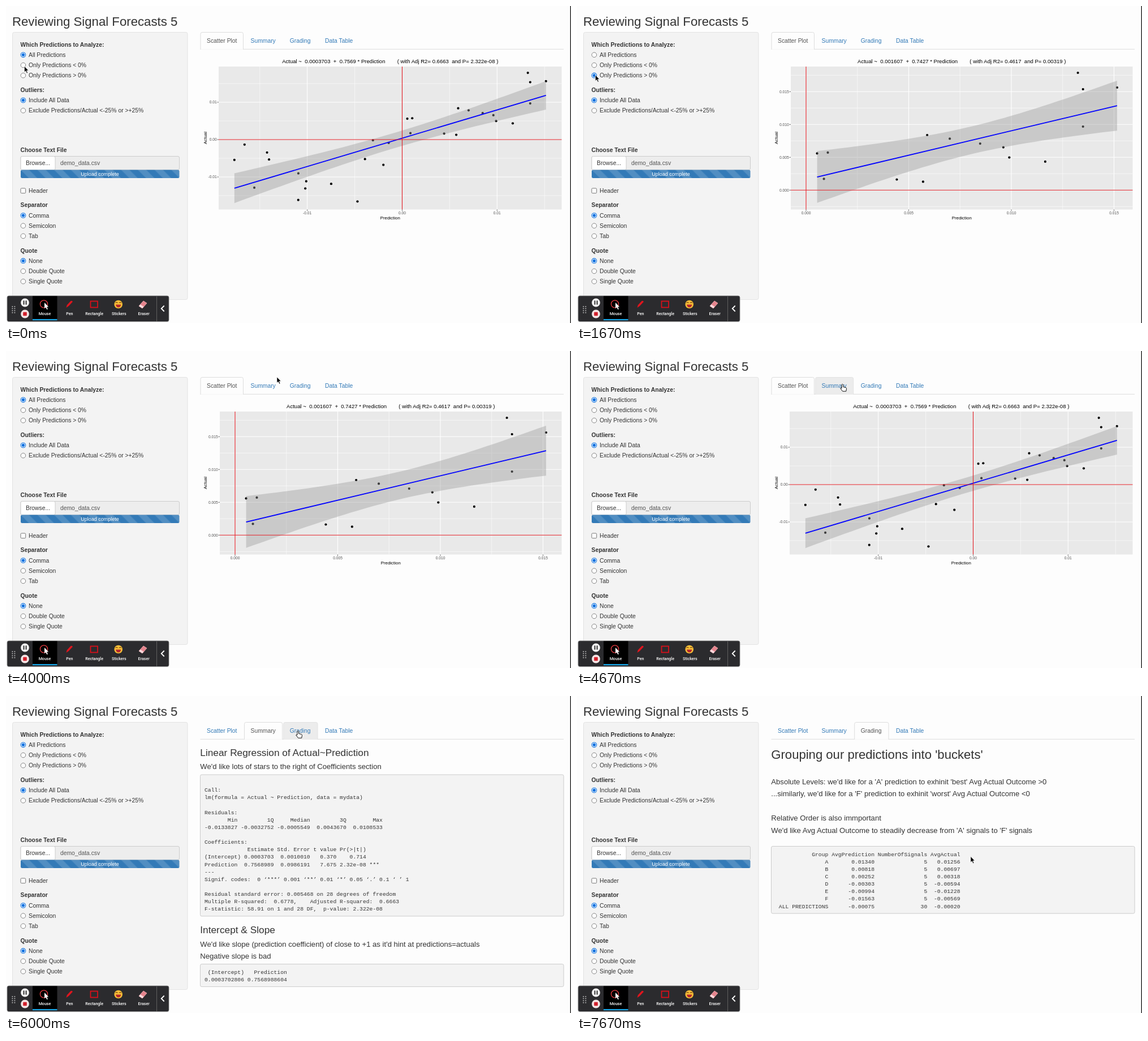
An HTML page for the animation above (8 s loop, 999 by 560 pixels).

```html
<!DOCTYPE html>
<html>
<head>
<meta charset="utf-8">
<style>
html, body { margin: 0; width: 100%; height: 100%; overflow: hidden; background: #fdfdfd; }
svg { display: block; width: 999px; height: 560px; font-family: "Liberation Sans", Arial, sans-serif; }
text { white-space: pre; }
.mono { font-family: "Liberation Mono", monospace; }
.bar { font-family: Roboto, sans-serif; font-weight: 500; }
</style>
</head>
<body>
<svg viewBox="0 0 999 560">
  <defs>
    <pattern id="stripes" width="29.6" height="29.6" patternUnits="userSpaceOnUse" x="26" y="289.5">
      <path fill="#337ab7" d="M0 0h29.6v29.6h-29.6z"/>
      <path fill="#fff" fill-opacity=".15" d="M0 0h14.8L29.6 14.8V29.6zM0 14.8L14.8 29.6H0z"/>
    </pattern>
  </defs>
  <g id="base"></g><g id="view"></g><g id="bar"></g><g id="mouse"></g>
</svg>
<script>
const $ = id => document.getElementById(id);
const esc = s => String(s).replace(/&/g, '&amp;').replace(/</g, '&lt;');
const text = (x, y, s, size = 10.35, fill = '#333', more = '') =>
  `<text x="${x}" y="${y}" font-size="${size}" fill="${fill}" ${more}>${esc(s)}</text>`;
const rect = (x, y, w, h, fill, more = '') =>
  `<rect x="${x}" y="${y}" width="${w}" height="${h}" fill="${fill}" ${more}/>`;
const path = (d, fill, stroke = 'none', w = 1, more = '') =>
  `<path d="${d}" fill="${fill}" stroke="${stroke}" stroke-width="${w}" ${more}/>`;
const dot = (x, y, r, fill, more = '') => `<circle cx="${x}" cy="${y}" r="${r}" fill="${fill}" ${more}/>`;
const BOLD = 'font-weight="bold"', MID = 'text-anchor="middle"', END = 'text-anchor="end"';

// Sidebar
const radio = (y, on) => on
  ? dot(30.4, y, 4.3, '#fff', 'stroke="#0b70e0" stroke-width="1.1"') + dot(30.4, y, 2.7, '#0b70e0')
  : dot(30.4, y, 4.3, '#fff', 'stroke="#767676" stroke-width=".9"');
const choices = (y, labels, on) => labels.map((s, i) =>
  radio(y + i * 18.2, i === on) + text(40, y + i * 18.2 + 3.7, s)).join('');
const label = (y, s) => text(25.5, y, s, 10.35, '#333', BOLD);

$('base').innerHTML =
  text(11, 35, 'Reviewing Signal Forecasts 5', 22.2) +
  rect(11.5, 46.5, 309.5, 472, '#f3f3f3', 'stroke="#e3e3e3" rx="3"') +
  label(71.6, 'Which Predictions to Analyze:') + label(151.6, 'Outliers:') +
  choices(166.5, ['Include All Data', 'Exclude Predictions/Actual <-25% or >+25%'], 0) +
  label(257.6, 'Choose Text File') +
  rect(26, 265.5, 280.5, 24, '#ededed', 'stroke="#ccc" rx="2.5"') +
  rect(26, 265.5, 61, 24, '#fff', 'stroke="#ccc" rx="2.5"') +
  text(35, 281, 'Browse...') + text(96, 281, 'demo_data.csv', 10.35, '#555') +
  rect(26, 289.5, 280.5, 14.5, 'url(#stripes)', 'rx="2.5"') +
  text(166, 300, 'Upload complete', 9, '#fff', MID) +
  rect(26, 322, 8.7, 8.7, '#fff', 'stroke="#767676" rx="1.5"') + text(40, 330, 'Header') +
  label(355.2, 'Separator') + choices(370, ['Comma', 'Semicolon', 'Tab'], 0) +
  label(435.6, 'Quote') + choices(450.2, ['None', 'Double Quote', 'Single Quote'], 0) +
  rect(997.6, 0, 1.4, 560, '#222');

// Recorder toolbar
const grip = [0, 1, 2, 3].map(i => dot(11.4, 531 + i * 3.6, 1, '#bbb') + dot(15.4, 531 + i * 3.6, 1, '#bbb')).join('');
const arrow = 'l0 10.2 2.4-2 1.9 4 1.6-.8-1.8-3.8 3.1-.2z';
$('bar').innerHTML =
  rect(2, 512, 286, 45.5, '#2b2b2e', 'rx="3" stroke="#888" stroke-width=".8"') +
  rect(47, 512.5, 43.5, 42.5, '#000') + rect(47, 553, 43.5, 2.2, '#14a5e6') + grip +
  dot(33.5, 524, 7.4, '#f4f4f4') + rect(30.5, 520.5, 2, 7, '#333') + rect(34.6, 520.5, 2, 7, '#333') +
  dot(33.5, 544, 7.4, '#f3e4e4') + rect(30.2, 540.7, 6.6, 6.6, '#d3202c', 'rx="1"') +
  dot(67, 526.5, 6.6, 'none', 'stroke="#e0393e" stroke-width="1.4"') + path('M68 524' + arrow, '#fff') +
  path('M106.5 533l1.2-4.5 6.6-7.2q2.6-1.6 3.6 1.2l-7 7.6z', '#e0151e') +
  rect(149.5, 521.5, 12.5, 11, 'none', 'stroke="#d8101a" stroke-width="1.8"') +
  dot(198.7, 527, 7.3, '#f6bf38') +
  path('M193.5 524.5q2-2 4 0M200 524.5q2-2 4 0', 'none', '#6b3a10', 1.1) +
  path('M194 527.5h9.4q-1 5-4.7 5t-4.7-5z', '#b3262c') +
  path('M235 530l8-9 6 4-8 9z', '#e5848d', '#f3aeb4', .8) + path('M235 530l2.5-2.8 6 4-2.5 2.8z', '#f8dadd') +
  ['Mouse', 'Pen', 'Rectangle', 'Stickers', 'Eraser'].map((s, i) =>
    text(68.5 + i * 43.8, 546, s, 7.1, '#fff', MID + ' class="bar"')).join('') +
  rect(266, 513, .9, 44, '#666') + path('M279.7 529.5l-5 5 5 5', 'none', '#fff', 1.8);

// Tabs
const tabs = [['Scatter Plot', 344, 419.5], ['Summary', 421.5, 488.7], ['Grading', 490.7, 551], ['Data Table', 553, 625]];
const tabBar = (on, hover) => path('M343.5 76.3H986', 'none', '#ddd') + tabs.map(([s, a, b], i) => {
  const box = `M${a} 76.8V49.5q0-3 3-3H${b - 3}q3 0 3 3V76.8`;
  const back = i === on ? path(box, '#fdfdfd', '#ddd') : i === hover ? path(box, '#ececec', '#e2e2e2') : '';
  return back + text(a + 11, 65.2, s, 10.35, i === on ? '#555' : '#337ab7');
}).join('');

// Scatter plot: values in units of 0.0001
const data = [
  [-176.8, -54.4], [-166.1, -13.3], [-142.4, -34.6], [-140.3, -53.3], [-155.8, -128.6], [-109.4, -90.4],
  [-101.1, -111.7], [-102.1, -130.8], [-109.5, -161.7], [-74.8, -118.5], [-47.1, -165.7], [-39.2, -52.2],
  [-19.8, -67.7], [-30.8, -1.8], [-14.2, -9], [5.4, 55.9], [10.6, 57.2], [8.7, 17.1], [44.2, 16.2],
  [57, 12.8], [59, 83.9], [70, 78.3], [84.8, 70.9], [96.1, 65.3], [99, 49.8], [116.5, 43.4],
  [134.9, 96.8], [134.9, 153.7], [132.4, 178.7], [151.5, 156.3]];
const plots = [
  { keep: () => true, left: 376, x0: 700.5, kx: 1.678, y0: 236, ky: .66, step: 100, dec: 2, q: 2.048,
    title: ['0.0003703  +  0.7569', '0.6663  and P= 2.322e-08'] },
  { keep: p => p[0] < 0, left: 380, x0: 955, kx: 3.1, y0: 118, ky: 1.388, step: 50, dec: 3, q: 2.16,
    title: ['-0.007295  +  0.07053', '-0.07147  and P= 0.801'] },
  { keep: p => p[0] > 0, left: 378, x0: 405, kx: 3.63, y0: 325.3, ky: 1.16, step: 50, dec: 3, q: 2.16,
    title: ['0.001607  +  0.7427', '0.4617  and P= 0.00319'] }];

function regress(pts) {
  const n = pts.length, sum = f => pts.reduce((s, p) => s + f(p), 0);
  const mx = sum(p => p[0]) / n, my = sum(p => p[1]) / n;
  const sxx = sum(p => (p[0] - mx) ** 2), b = sum(p => (p[0] - mx) * (p[1] - my)) / sxx;
  const at = x => my + b * (x - mx);
  const s = Math.sqrt(sum(p => (p[1] - at(p[0])) ** 2) / (n - 2));
  return { at, err: x => s * Math.sqrt(1 / n + (x - mx) ** 2 / sxx) };
}

function drawPlot({ keep, left, x0, kx, y0, ky, step, dec, q, title }) {
  const R = 982.5, T = 107, B = 359.5, mid = (left + R) / 2;
  const X = v => x0 + v * kx, Y = v => y0 - v * ky;
  const pts = data.filter(keep), { at, err } = regress(pts);
  let grid = '', axis = '';
  for (let i = -8; i <= 8; i++) {
    const v = i * step / 2, x = X(v), y = Y(v), major = i % 2 === 0, w = major ? 1.1 : .55;
    const name = (v / 1e4).toFixed(dec);
    if (x > left && x < R) {
      grid += path(`M${x} ${T}V${B}`, 'none', '#fff', w);
      if (major) axis += path(`M${x} ${B}v2.5`, 'none', '#444', .8) + text(x, 368, name, 6.7, '#555', MID);
    }
    if (y > T && y < B) {
      grid += path(`M${left} ${y}H${R}`, 'none', '#fff', w);
      if (major) axis += path(`M${left} ${y}h-2.5`, 'none', '#444', .8) + text(left - 3.2, y + 2.4, name, 6.7, '#555', END);
    }
  }
  const xs = pts.map(p => p[0]), lo = Math.min(...xs), hi = Math.max(...xs);
  const steps = Array.from({ length: 41 }, (_, i) => lo + (hi - lo) * i / 40);
  const edge = sign => steps.map(x => X(x) + ' ' + Y(at(x) + sign * q * err(x)));
  const band = 'M' + [...edge(1), ...edge(-1).reverse()].join('L') + 'z';
  return rect(left, T, R - left, B - T, '#e9e9e9') + grid +
    pts.map(p => dot(X(p[0]), Y(p[1]), 2.1, '#000')).join('') +
    path(band, '#999', 'none', 0, 'fill-opacity=".4"') +
    path(`M${X(lo)} ${Y(at(lo))}L${X(hi)} ${Y(at(hi))}`, 'none', '#00f', 1.8) +
    path(`M${left} ${y0}H${R}M${x0} ${T}V${B}`, 'none', '#e01c24', 1.1) + axis +
    text(mid, 101.3, `Actual ~  ${title[0]} * Prediction        ( with Adj R2= ${title[1]} )`, 9.57, '#000', MID) +
    text(mid, 377, 'Prediction', 7.9, '#000', MID) +
    text(0, 0, 'Actual', 7.9, '#000', MID + ' transform="translate(354.5 233) rotate(-90)"');
}

// Text views
const pre = (y, lines) => rect(343.5, y + .5, 642.5, 13.8 + Math.max(0, lines.length * 13.13 - .2), '#f3f3f3', 'stroke="#ccc" rx="2.5"') +
  lines.map((s, i) => text(351, y + 17.6 + i * 13.13, s, 9.72, '#333', 'class="mono"')).join('');
const h3 = (y, s) => text(343.3, y, s, 17.3);
const h4 = (y, s) => text(343.3, y, s, 13.12);

const report = `
Call:
lm(formula = Actual ~ Prediction, data = mydata)

Residuals:
       Min         1Q     Median         3Q        Max
-0.0133827 -0.0032752 -0.0005549  0.0043670  0.0108533

Coefficients:
             Estimate Std. Error t value Pr(>|t|)
(Intercept) 0.0003703  0.0010010   0.370    0.714
Prediction  0.7568989  0.0986191   7.675 2.32e-08 ***
---
Signif. codes:  0 ‘***’ 0.001 ‘**’ 0.01 ‘*’ 0.05 ‘.’ 0.1 ‘ ’ 1

Residual standard error: 0.005468 on 28 degrees of freedom
Multiple R-squared:  0.6778,    Adjusted R-squared:  0.6663
F-statistic: 58.91 on 1 and 28 DF,  p-value: 2.322e-08`.split('\n');
const slope = [' (Intercept)   Prediction', '0.0003702806 0.7568988604'];
const grades = `Group,AvgPrediction,NumberOfSignals,AvgActual
A,0.01340,5,0.01256
B,0.00818,5,0.00697
C,0.00252,5,0.00318
D,-0.00303,5,-0.00594
E,-0.00994,5,-0.01228
F,-0.01563,5,-0.00569
ALL PREDICTIONS,-0.00075,30,-0.00020`.split('\n')
  .map(row => row.split(',').map((s, i) => s.padStart([16, 14, 16, 10][i])).join(''));

function summary(full) {
  const d = full ? 236.3 : 0;
  return h3(106, 'Linear Regression of Actual~Prediction') +
    h4(129.3, "We'd like lots of stars to the right of Coefficients section") +
    pre(138.5, full ? report : []) + h3(183 + d, 'Intercept & Slope') +
    h4(206.4 + d, "We'd like slope (prediction coefficient) of close to +1 as it'd hint at predictions=actuals") +
    h4(227.7 + d, 'Negative slope is bad') + pre(236.8 + d, full ? slope : []);
}
const grading = full => text(343.3, 111, "Grouping our predictions into 'buckets'", 22.1) +
  h4(156.2, "Absolute Levels: we'd like for a 'A' prediction to exhinit 'best' Avg Actual Outcome >0") +
  h4(177.3, "...similarly, we'd like for a 'F' prediction to exhinit 'worst' Avg Actual Outcome <0") +
  h4(220.2, 'Relative Order is also immportant') +
  h4(241.5, "We'd like Avg Actual Outcome to steadily decrease from 'A' signals to 'F' signals") +
  pre(265, full ? grades : []);

// Each view: active tab and its content
const views = {
  all: [0, drawPlot(plots[0])], neg: [0, drawPlot(plots[1])], pos: [0, drawPlot(plots[2])],
  wait: [1, summary(false)], sum: [1, summary(true)], load: [2, grading(false)], grade: [2, grading(true)]
};

const hand = 'm-1.3 1q1.3-2 2.6 0v4l4.6 1q1.4.5 1.3 2.2l-.8 4.5h-6l-4-5.2q.6-1.4 2.3 0z';
const pointer = (x, y, isHand) => isHand
  ? path(`M${x} ${y}${hand}`, '#fff', '#111', 1)
  : path(`M${x} ${y}${arrow}`, '#000', '#fff', .6);

// Changes by step: view, chosen radio, cursor x, y, click ring, hovered tab (-1 for a plain arrow)
const script = {
  0: ['all', 0, 32.5, 106.5, 0, -1], 1: ['all', 1, 32.5, 106.5, 1, -1], 2: ['neg', 1, 32.5, 106.5, 0, -1],
  3: ['neg', 1, 33, 115, 0, -1], 4: ['neg', 2, 32.5, 122, 1, -1], 5: ['pos', 2, 32.5, 122, 0, -1],
  9: ['pos', 2, 37, 99, 0, -1], 10: ['pos', 2, 32.5, 87, 0, -1], 11: ['pos', 0, 32.5, 87, 1, -1],
  12: ['pos', 0, 479, 46, 0, -1], 13: ['all', 0, 545, 61, 0, 2], 14: ['all', 0, 469.3, 58.5, 0, 1],
  15: ['wait', 0, 469.3, 58.5, 1, 1], 16: ['sum', 0, 469.3, 58.5, 0, 1], 17: ['sum', 0, 505, 60, 0, 2],
  18: ['sum', 0, 516.3, 61.5, 0, 2], 19: ['load', 0, 516.3, 61.5, 1, 2], 20: ['grade', 0, 516.3, 61.5, 0, 2],
  21: ['grade', 0, 795, 177, 0, -1], 22: ['grade', 0, 397, 416, 0, -1], 23: ['grade', 0, 696, 283.5, 0, -1]
};
const ANALYZE = ['All Predictions', 'Only Predictions < 0%', 'Only Predictions > 0%'];
const starts = Array.from({ length: 24 }, (_, i) => Math.round(i * 100 / 3) * 10);

let shown;
function draw(now) {
  let k = starts.filter(s => s <= now % 8000).length - 1;
  while (!script[k]) k--;
  if (k !== shown) {
    shown = k;
    const [name, chosen, x, y, click, hover] = script[k], [tab, content] = views[name];
    $('view').innerHTML = choices(86.3, ANALYZE, chosen) + tabBar(tab, hover) + content;
    $('mouse').innerHTML =
      (click ? dot(x + .7, y + 2.5, 8, 'none', 'stroke="#e0444a" stroke-width="1.3"') : '') + pointer(x, y, hover >= 0);
  }
  requestAnimationFrame(draw);
}
draw(0);
</script>
</body>
</html>
```
